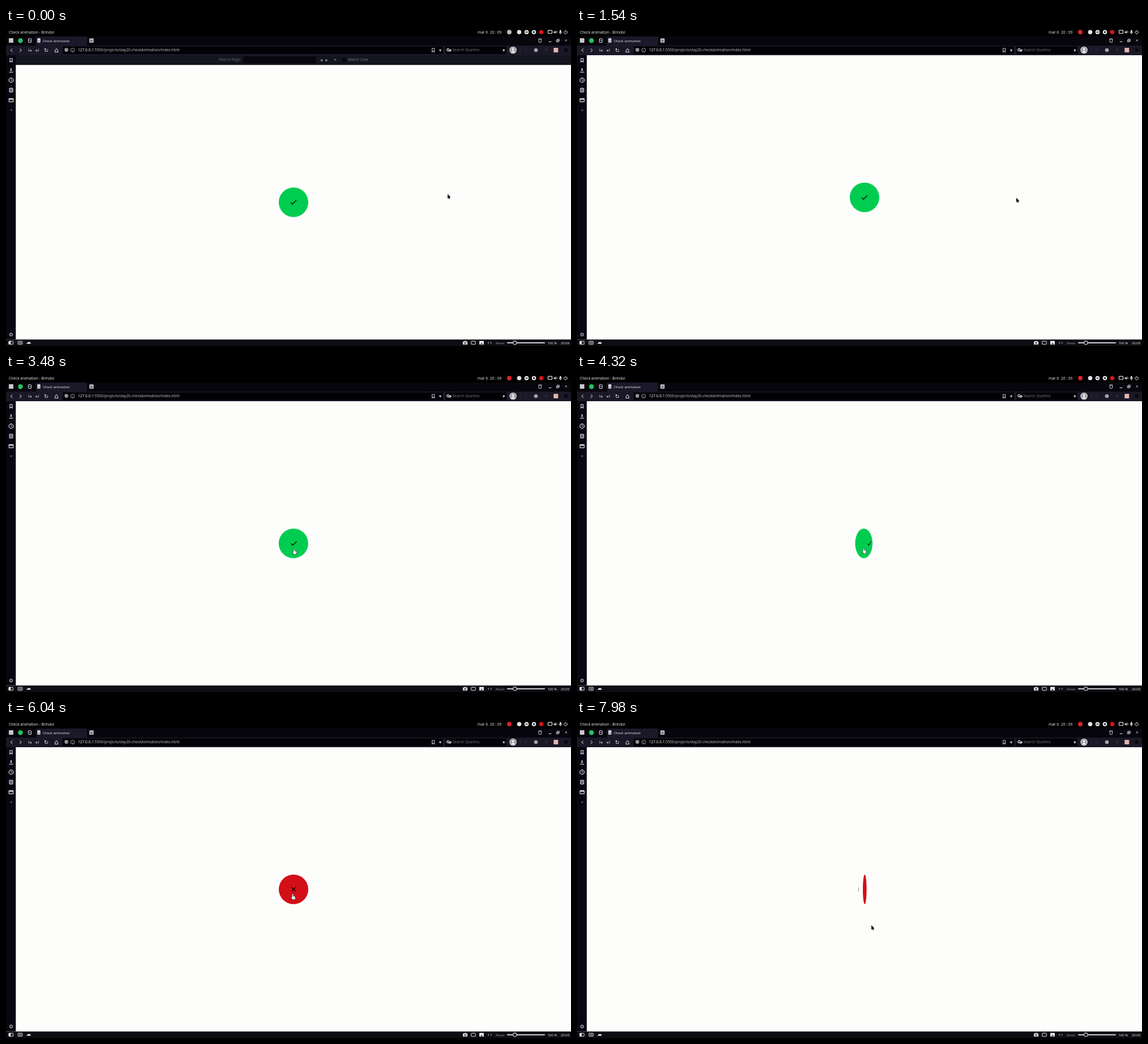
An HTML page with a canvas that plays this animation: 998 px wide and 561 px high, repeating every 8 s.

```html
<!DOCTYPE html>
<html lang="en">
<head>
<meta charset="utf-8">
<title>Check animation</title>
<style>
html, body { margin: 0; width: 100%; height: 100%; overflow: hidden; background: #000; }
canvas { display: block; }
</style>
</head>
<body>
<canvas id="stage" width="998" height="561"></canvas>
<script>
const ctx = document.getElementById('stage').getContext('2d');
const LOOP = 8000;
const LIGHT = '#e4e4e8', GREY = '#a5a5ac', DIM = '#74747a', INK = '#08070e';
const GREEN = '#00cd50', RED = '#d30f18';

// Button flip, counted in ticks
const FLIP = 62.5, HOVER_IN = 67.2, HOVER_OUT = 140.2;
const RADIUS = 26, DEPTH = 10.4, VIEW = 260;

// Page edges
const LEFT = 17.3, TOP = 48, BOTTOM = 549.5, FIND = 17.2;

// Pointer stops: tick, x, y
const STOPS = [
  [31, 780, 293], [33, 772, 306], [41, 655, 357], [48, 557, 350], [66, 524, 317],
  [74, 506.5, 307], [132, 506.5, 307], [141, 511, 328], [150, 513, 350], [170, 520, 362]
];

const mix = (a, b, k) => a + (b - a) * k;
const clamp = v => Math.max(0, Math.min(1, v));

// CSS ease-in-out, solved by bisection
function easeInOut(x) {
  if (x <= 0 || x >= 1) return clamp(x);
  let lo = 0, hi = 1, s = 0.5;
  for (let i = 0; i < 24; i++) {
    s = (lo + hi) / 2;
    const v = 1.26 * s * (1 - s) ** 2 + 1.74 * s * s * (1 - s) + s ** 3;
    if (v < x) lo = s; else hi = s;
  }
  return s * s * (3 - 2 * s);
}

function tickAt(ms) {
  const t = ms - 20, k = Math.floor(t / 140), r = t - k * 140;
  return 3 * k + (r < 100 ? 0 : r < 120 ? 1 : 2);
}

function pointerAt(n) {
  const i = Math.max(1, STOPS.findIndex(s => n <= s[0]));
  const [a, ax, ay] = STOPS[i - 1], [b, bx, by] = STOPS[i];
  const k = clamp((n - a) / (b - a));
  return [mix(ax, bx, k), mix(ay, by, k)];
}

function paint(color, line) {
  ctx.fillStyle = ctx.strokeStyle = color;
  ctx.lineWidth = line;
  if (line) ctx.stroke(); else ctx.fill();
}

function rect(x, y, w, h, color) {
  ctx.fillStyle = color;
  ctx.fillRect(x, y, w, h);
}

// Rounded box around a centre
function box(x, y, w, h, color, line, r = 0.7) {
  ctx.beginPath();
  ctx.roundRect(x - w / 2, y - h / 2, w, h, r);
  paint(color, line);
}

function arc(x, y, r, from, to, color, line) {
  ctx.beginPath();
  ctx.arc(x, y, r, from, to);
  paint(color, line);
}

const disc = (x, y, r, color, line) => arc(x, y, r, 0, Math.PI * 2, color, line);

function line(x, y, dx, dy, color, width = 1) {
  ctx.beginPath();
  ctx.moveTo(x, y);
  ctx.lineTo(x + dx, y + dy);
  paint(color, width);
}

function text(str, x, y, size, color) {
  ctx.font = size + 'px "Noto Sans", "Open Sans", sans-serif';
  ctx.fillStyle = color;
  ctx.fillText(str, x, y);
  return ctx.measureText(str).width;
}

// Symbol with its ink centred on a point
function icon(ch, x, y, size, color = LIGHT) {
  ctx.font = size + 'px "DejaVu Sans", sans-serif';
  ctx.fillStyle = color;
  const m = ctx.measureText(ch);
  ctx.fillText(ch,
    x + (m.actualBoundingBoxLeft - m.actualBoundingBoxRight) / 2,
    y + (m.actualBoundingBoxAscent - m.actualBoundingBoxDescent) / 2);
}

function bookmark(x, y, color = LIGHT) {
  ctx.beginPath();
  for (const [dx, dy] of [[0, 1.6], [-2, 3.4], [-2, -3], [2, -3], [2, 3.4]]) ctx.lineTo(x + dx, y + dy);
  ctx.closePath();
  paint(color, 1.1);
}

function sheet(x, y) {
  box(x, y, 5.6, 6.6, LIGHT, 1.2);
  for (const d of [-1.2, 0.9]) line(x - 1.7, y + d, 3.4, 0, LIGHT);
}

function panes(x, y) {
  box(x, y, 7.6, 5.6, LIGHT, 1.1);
  line(x - 3.8, y - 1.8, 7.6, 0, LIGHT, 1.8);
}

function clock(x, y) {
  disc(x, y, 3.8, LIGHT, 1.2);
  line(x, y + 0.4, 0, -2.6, LIGHT);
  line(x, y, 1.8, 1, LIGHT);
}

function download(x, y) {
  icon('⬇', x, y - 1, 7);
  line(x - 3.5, y + 3.6, 7, 0, LIGHT, 1.2);
}

function titleBar(live) {
  rect(0, 0, 998, 15, '#000');
  text('Check animation - Brindol', 5, 10, 6.6, LIGHT);
  text('mar 6', 833, 10, 6.6, LIGHT);
  text('20 : 09', 855, 10, 6.6, LIGHT);
  disc(889, 7.3, 4, live ? '#d8232b' : '#b9b9bd');
  for (let i = 0; i < 4; i++) disc(906.5 + 13 * i, 7.3, 3.8, i < 3 ? LIGHT : '#d8121b');
  line(917.5, 7.3, 4, 0, '#111', 1.4);
  box(932.5, 7.3, 3, 3, '#222');
  box(961, 6.8, 7, 5.4, LIGHT, 1.2);
  icon('◀', 969, 7, 6);
  arc(970.5, 7, 2.6, -1, 1, LIGHT, 1);
  box(979.3, 6, 2.6, 5, LIGHT, 0, 1.3);
  arc(979.3, 6.6, 2.6, 0, Math.PI, LIGHT, 0.8);
  line(979.3, 9, 0, 2, LIGHT);
  arc(988.6, 7.4, 2.8, -1, 4.14, LIGHT, 1);
  line(988.6, 3.6, 0, 3.6, LIGHT);
}

function tabBar() {
  rect(0, 15, 998, 16, '#07060d');
  box(98, 23, 90, 16, '#1b1829', 0, 2);
  box(9, 22, 8, 8, '#c6c6ca');
  disc(25.5, 22.2, 4.2, '#22c45e');
  box(42, 22.2, 5, 6.8, LIGHT, 1);
  line(40.5, 20.5, 3, 3, LIGHT);
  box(58, 22, 5.3, 7.4, LIGHT);
  for (const y of [22, 23.8]) line(56.6, y, 3, 0, '#333', 0.6);
  text('Check animation', 65, 24.5, 6.05, LIGHT);
  box(151, 22.1, 7.6, 7.6, '#b4b4ba', 0, 1.2);
  icon('+', 151, 22.1, 7, '#111');
  box(943.4, 22.5, 4.4, 5.6, LIGHT, 0.9);
  line(940.4, 19.4, 6, 0, LIGHT);
  line(958.8, 24.2, 4.6, 0, LIGHT, 1.1);
  box(975.5, 21.4, 3.8, 3.4, LIGHT, 0.8, 0);
  box(974.2, 22.8, 3.8, 3.4, LIGHT, 0.8, 0);
  icon('✕', 989.3, 22.2, 6);
}

function field(x, w) {
  rect(x, 32.5, w, 13.5, '#020206');
}

function addressBar() {
  const y = 39;
  rect(0, 31, 998, TOP - 31, '#1a1827');
  icon('‹', 9.5, y, 16, GREY);
  icon('›', 26, y, 16, GREY);
  icon('◂', 43, y, 8, GREY);
  line(40.3, y - 2.6, 0, 5.2, GREY);
  icon('▸', 54.5, y, 8, GREY);
  line(57.3, y - 2.6, 0, 5.2, GREY);
  icon('↻', 71, y, 10);
  icon('⌂', 88.7, y, 12);

  field(100, 672);
  box(106.6, y - 1, 6, 5, '#96969c');
  arc(106.6, y, 3, 0, Math.PI, '#96969c');
  disc(117.8, y, 3.4, '#b5b5ba', 0.9);
  icon('i', 117.8, y, 5.5);
  const host = text('127.0.0.1', 127, 41.4, 6.57, '#f4f4f6');
  text(':5500/projects/day20-checkAnimation/index.html', 127 + host, 41.4, 6.57, '#bdbdc2');
  bookmark(754.7, y, '#bcbcc2');

  field(776, 108);
  disc(780.8, y - 0.7, 2, LIGHT, 1.2);
  line(782.2, y + 0.8, 2, 2, LIGHT, 1.3);
  text('Search Quelmo', 789, 41.4, 6.6, DIM);
  for (const x of [767, 785.3, 879.3]) icon('▾', x, y, 8);

  disc(895.6, y, 6.3, '#d9d9db');
  disc(895.6, y, 5.2, '#9b9ba0');
  disc(895.6, y - 1.4, 2, '#f2f2f4');
  arc(895.6, y + 4.2, 3, Math.PI, 0, '#f2f2f4');
  line(908.4, 34, 0, 10, '#2d2b3c');
  text('f?', 916, 41.5, 7, '#2b2c49');
  disc(936, y, 3.3, GREY);
  disc(954, y, 3, '#25232f');
  box(971.3, y, 8, 8, '#e2b5ac');
  disc(989, y, 3.2, INK);
}

function findBar(y) {
  rect(0, y, 998, FIND, '#15151f');
  const mid = y + 8, base = y + 10.3;
  text('Find in Page:', 376, base, 6.5, '#68686f');
  box(483.5, mid, 129, 12, INK);
  icon('◂', 557, mid, 8, GREY);
  icon('▸', 566.5, mid, 8, GREY);
  icon('✕', 581.5, mid, 6, GREY);
  box(597.3, mid, 7.5, 7.5, INK);
  text('Match Case', 604, base, 6.6, '#77777e');
}

function sidePanel() {
  rect(0, TOP, LEFT, BOTTOM - TOP, '#070611');
  const add = (x, y) => icon('+', x, y, 6.5, GREY);
  [bookmark, download, clock, sheet, panes, add].forEach((draw, i) => draw(9, 56.7 + 17.65 * i));
  icon('⚙', 9, 541, 9);
}

function statusBar() {
  const y = 555.3, base = 557.5;
  rect(0, BOTTOM, 998, 12, '#0d0e13');
  for (const x of [8.8, 25, 825.5]) box(x, y, 7.6, 5.4, LIGHT, 1);
  box(6.6, y, 3.6, 5.4, LIGHT);
  for (const x of [23.8, 26.3]) box(x, y, 1.4, 2.6, LIGHT);
  icon('☁', 39.7, y, 9);
  box(811, y + 0.4, 8, 5.6, LIGHT);
  box(811, y - 2.4, 3.4, 2, LIGHT);
  disc(811, y + 0.4, 1.5, '#111', 0.9);
  box(840, y, 8, 6.4, LIGHT);
  icon('▴', 840, y + 0.8, 6, '#222');
  icon('‹', 852, y, 9);
  icon('›', 856.5, y, 9);
  text('Reset', 865, base, 5.9, '#919197');
  box(918.5, y, 67, 1.8, '#f0f0f2');
  disc(898.8, y, 3.2, '#15161b');
  disc(898.8, y, 3.2, '#d4d4d8', 1.1);
  text('100 %', 956.5, base, 5.9, LIGHT);
  text('20:09', 980, base, 5.9, LIGHT);
}

function button(cx, cy, angle) {
  const cos = Math.cos(angle), sin = Math.sin(angle), front = cos > 0;
  ctx.beginPath();
  for (let a = 0; a < Math.PI * 2; a += Math.PI / 45) {
    const x = RADIUS * Math.cos(a), y = RADIUS * Math.sin(a);
    const k = VIEW / (VIEW + x * sin);
    ctx.lineTo(cx + x * cos * k, cy + y * k);
  }
  ctx.closePath();
  paint(front ? GREEN : RED);

  ctx.save();
  ctx.translate(cx + (front ? 1 : -1) * DEPTH * sin, cy);
  ctx.scale(Math.abs(cos), 1);
  ctx.beginPath();
  if (front) {
    ctx.moveTo(-4.9, 0.3);
    ctx.lineTo(-1.9, 3.4);
    ctx.lineTo(4.9, -3.6);
  } else {
    for (const d of [-3.7, 3.7]) {
      ctx.moveTo(-3.7, d);
      ctx.lineTo(3.7, -d);
    }
  }
  paint('#140806', 1.4);
  ctx.restore();
}

function arrowPointer(x, y) {
  line(x + 1.5, y + 4, 2, 4.6, '#111', 1.5);
  ctx.beginPath();
  ctx.moveTo(x, y);
  ctx.lineTo(x, y + 7.8);
  ctx.lineTo(x + 5.3, y + 5.5);
  ctx.closePath();
  paint('#0b0b0d');
}

function handPointer(x, y) {
  for (const [color, grow] of [['#1a1a1c', 1.2], ['#fff', 0]]) {
    box(x, y + 3.5, 1.7 + grow, 7 + grow, color, 0, 1);
    box(x + 1.6, y + 7, 5.6 + grow, 5.4 + grow, color, 0, 1.6);
    box(x - 1.4, y + 6.6, 2 + grow, 2 + grow, color, 0, 1);
  }
  for (const dx of [1.3, 2.8]) line(x + dx, y + 6.4, 0, 2, '#555', 0.5);
}

function draw(ms) {
  const n = tickAt(ms);
  const shut = easeInOut((n + 1) / 9);
  const lift = FIND * shut;
  const angle = Math.PI * (easeInOut((n - HOVER_IN) / FLIP) - easeInOut((n - HOVER_OUT) / FLIP));

  rect(0, 0, 998, 561, '#fdfdfc');
  button(507.9, 307.4 - lift / 2, angle);
  if (shut < 1) findBar(TOP - lift);
  titleBar(n >= 0);
  tabBar();
  addressBar();
  sidePanel();
  statusBar();

  const [x, y] = pointerAt(n);
  if (n > HOVER_IN && n < HOVER_OUT) handPointer(x, y);
  else arrowPointer(x, y);
}

function run() {
  draw(performance.now() % LOOP);
  requestAnimationFrame(run);
}
run();
</script>
</body>
</html>
```
